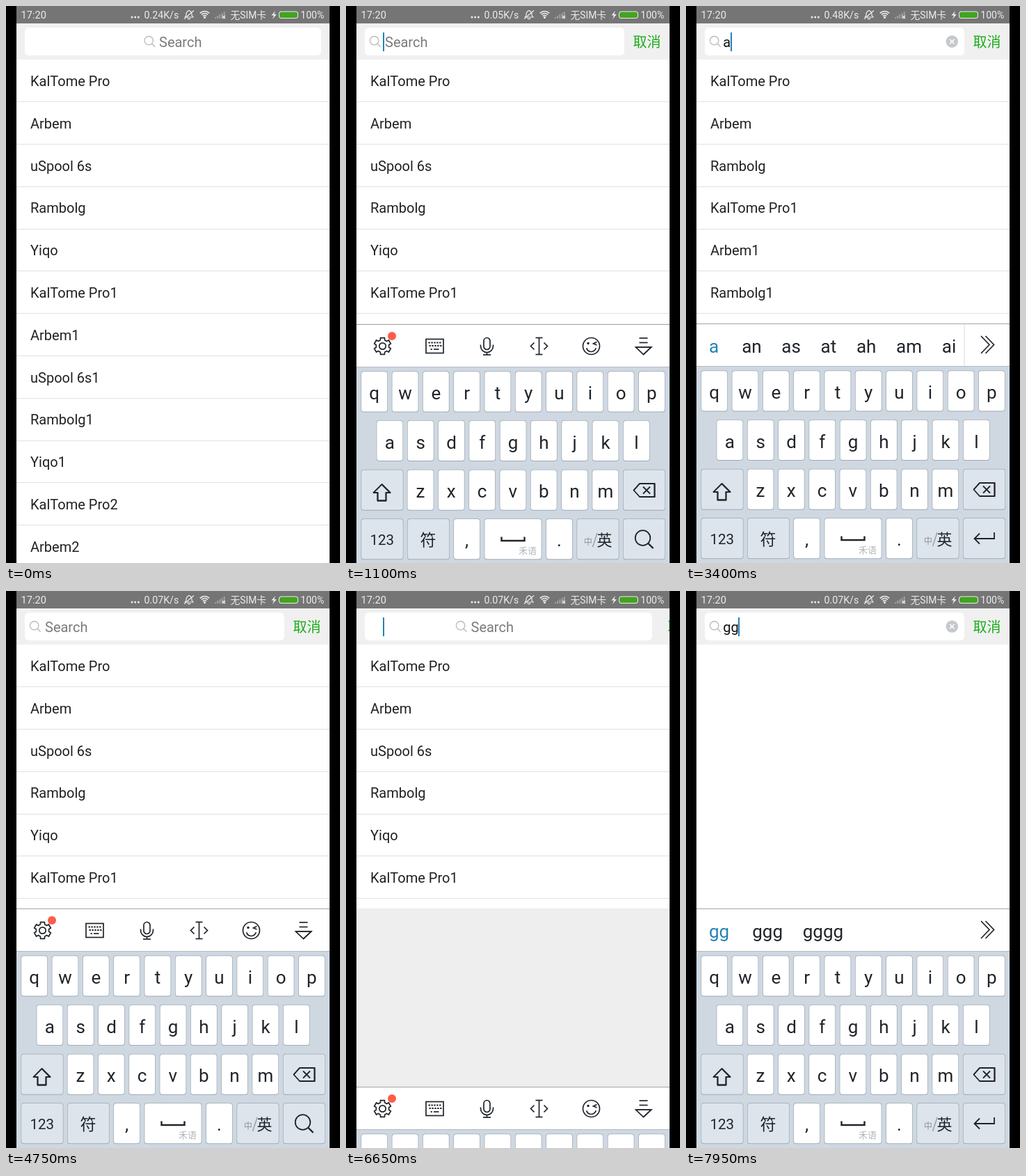
An HTML page with a canvas for the animation above (8 s loop, 480 by 800 pixels).

```html
<!DOCTYPE html>
<html lang="en">
<head>
<meta charset="utf-8">
<title>Search list</title>
<style>
html, body { margin: 0; width: 100%; height: 100%; overflow: hidden; background: #000; }
canvas { display: block; width: 480px; height: 800px; }
</style>
</head>
<body>
<canvas id="stage" width="480" height="800"></canvas>
<script>
const ctx = document.getElementById('stage').getContext('2d');
const LOOP = 8000, LEFT = 15, RIGHT = 465, KB_TOP = 456;
const SANS = 'Roboto, "Noto Sans CJK SC", "Noto Sans CJK", sans-serif';
const CJK = '"Noto Sans CJK SC", "Noto Sans CJK", sans-serif';
const INK = '#20242a', BLUE = '#2583b4';

const names = ['KalTome Pro', 'Arbem', 'uSpool 6s', 'Rambolg', 'Yiqo'];
const items = ['', 1, 2].flatMap(n => names.map(name => name + n));
const words = {
  a: ['a', 'an', 'as', 'at', 'ah', 'am', 'ai'],
  g: ['g', 'go', 'get', 'got', 'good', 'gas'],
  gg: ['gg', 'ggg', 'gggg']
};

// Timeline
const speeds = [[0, '0.24K/s'], [700, '0.05K/s'], [2800, '0.48K/s'], [4500, '0.07K/s']];
const edits = [[0, ''], [705, ''], [2400, 'a'], [4200, ''], [6555, ''], [7750, 'g'], [7950, 'gg']];
const OPEN = [705, 6555], CLOSE = 5400;

const latest = (list, t) => list.filter(e => e[0] <= t).pop();
const unit = x => Math.min(1, Math.max(0, x));
const smooth = x => (1 - Math.cos(Math.PI * unit(x))) / 2;
const slow = x => 1 - (1 - unit(x)) ** 2;
const speedUp = x => unit(x) ** 2;

const fieldOpen = t => smooth((t - OPEN[0]) / 290) - smooth((t - CLOSE) / 290) + smooth((t - OPEN[1]) / 290);
const keysOpen = t => slow((t - 750) / 370) - speedUp((t - 5430) / 428) + slow((t - 6600) / 370);

// Drawing helpers
function rect(x, y, w, h, color) {
  ctx.fillStyle = color;
  ctx.fillRect(x, y, w, h);
}
function round(x, y, w, h, r, color) {
  ctx.fillStyle = color;
  ctx.beginPath();
  ctx.roundRect(x, y, w, h, r);
  ctx.fill();
}
function text(s, x, y, size, color, align = 'left', family = SANS) {
  ctx.font = `${size}px ${family}`;
  ctx.textAlign = align;
  ctx.fillStyle = color;
  ctx.fillText(s, x, y);
}
function pen(color, width) {
  ctx.strokeStyle = color;
  ctx.lineWidth = width;
}
function line(...p) {
  ctx.beginPath();
  for (let i = 0; i < p.length; i += 2) ctx.lineTo(p[i], p[i + 1]);
  ctx.stroke();
}
function shape(...p) {
  line(...p);
  ctx.closePath();
  ctx.stroke();
}
function arc(x, y, r, from = 0, to = 2 * Math.PI) {
  ctx.beginPath();
  ctx.arc(x, y, r, from, to);
  ctx.stroke();
}
function dot(x, y, r, color) {
  ctx.fillStyle = color;
  ctx.beginPath();
  ctx.arc(x, y, r, 0, 2 * Math.PI);
  ctx.fill();
}
function at(x, y, draw) {
  ctx.save();
  ctx.translate(x, y);
  draw();
  ctx.restore();
}

function statusBar(t) {
  const c = '#ececec';
  rect(LEFT, 0, 450, 25, '#757575');
  text('17:20', 21.5, 18, 14.6, c);
  for (const x of [181, 185.7, 190.4]) dot(x, 16, 1.5, c);
  text(latest(speeds, t)[1], 198.5, 18, 14.2, c);
  pen(c, 1.2);
  at(263, 12.5, () => {
    line(-6, 3.5, -4, 1, -4, -1.5, -2.5, -4.5, 0, -6, 2.5, -4.5, 4, -1.5, 4, 1, 6, 3.5, -6, 3.5);
    arc(0, 4.5, 1.8, 0, Math.PI);
    line(-7, 6, 7, -6);
  });
  pen(c, 1.7);
  for (const r of [3.5, 6.5, 9.5]) arc(285.5, 17, r, -2.36, -0.78);
  dot(285.5, 16.5, 1.6, c);
  for (let i = 0; i < 5; i++) rect(300 + i * 3.2, 16 - i * 2, 1.8, 2 + i * 2, '#a5a5a5');
  pen(c, 1.1);
  line(311, 14, 315, 18);
  line(315, 14, 311, 18);
  text('无SIM卡', 322.5, 18, 13.8, c);
  ctx.fillStyle = c;
  ctx.beginPath();
  for (const [x, y] of [[387, 7], [381.5, 13.5], [385, 13.5], [383, 19], [388.8, 12], [385.4, 12]]) ctx.lineTo(x, y);
  ctx.fill();
  round(392, 7.5, 28, 10.5, 4, c);
  round(393, 8.5, 26, 8.5, 3, '#43a321');
  text('100%', 423.3, 18, 14, c);
}

function searchBar(t, value, typedAt) {
  const open = fieldOpen(t), rest = 1 - open;
  rect(LEFT, 25, 450, 52, '#f0f0f0');
  round(27, 31, 373 + 53 * rest, 40, 6, '#fff');
  at(34 + 164.5 * rest, 43, () => {
    pen('#b9bcc0', 1.4);
    arc(6.7, 6.7, 6.2);
    line(11.2, 11.2, 15.8, 15.8);
  });
  if (value) {
    text(value, 53.3, 59, 20, '#111');
    dot(382.3, 51, 8.7, '#c5c8cc');
    pen('#fff', 1.6);
    line(379, 47.7, 385.6, 54.3);
    line(385.6, 47.7, 379, 54.3);
  } else {
    text('Search', 56 + 164 * rest, 59, 20, '#7b7b7b');
  }
  const focused = t >= OPEN[0] && t < CLOSE || t >= OPEN[1];
  if (focused && (t - typedAt) % 1000 < 500) {
    ctx.font = `20px ${SANS}`;
    rect(53 + Math.round(ctx.measureText(value).width), 38, 2, 27, BLUE);
  }
  if (open > 0) text('取消', 412.5 + 66 * rest, 59, 20, '#1aad19', 'left', CJK);
}

function list(value, bottom) {
  rect(LEFT, 77, 450, 723, '#eee');
  ctx.save();
  ctx.beginPath();
  ctx.rect(LEFT, 77, 450, bottom - 77);
  ctx.clip();
  rect(LEFT, 77, 450, 723, '#fff');
  items.filter(s => s.toLowerCase().includes(value)).forEach((s, i) => {
    text(s, 35, 115 + Math.round(60.8 * i), 20, '#212121');
    rect(LEFT, Math.round(137.2 + 60.8 * i), 450, 1, '#e1e1e8');
  });
  ctx.restore();
}

function gear() {
  ctx.beginPath();
  for (let i = 0; i < 6; i++) {
    const a = i * Math.PI / 3 + Math.PI / 6;
    for (const [d, r] of [[-0.34, 9.3], [-0.24, 12.3], [0.24, 12.3], [0.34, 9.3]])
      ctx.lineTo(r * Math.cos(a + d), r * Math.sin(a + d));
  }
  ctx.closePath();
  ctx.stroke();
  arc(0, 0, 4.7);
}
function keyboardIcon() {
  ctx.strokeRect(-12.5, -10, 25, 20);
  for (const y of [-5, -0.5])
    for (let i = 0; i < 5; i++) rect(-9 + i * 3.9 + (y > -1 ? 1 : 0), y - 1, 2.4, 2, INK);
  line(-6, 4.5, -3.5, 4.5);
  line(-1.5, 4.5, 6, 4.5);
}
function mic() {
  ctx.beginPath();
  ctx.roundRect(-4.5, -12, 9, 17, 4.5);
  ctx.stroke();
  ctx.beginPath();
  ctx.moveTo(-9, -2);
  ctx.arc(0, 0, 9, Math.PI, 0, true);
  ctx.lineTo(9, -2);
  ctx.stroke();
  line(0, 9, 0, 12.5);
  line(-5.5, 12.5, 5.5, 12.5);
}
function caret() {
  line(0, -12, 0, 12);
  line(-5, -12, 5, -12);
  line(-5, 12, 5, 12);
  line(-7, -5, -12, 0, -7, 5);
  line(7, -5, 12, 0, 7, 5);
}
function smile() {
  arc(0, 0, 12);
  arc(0, 1, 7, 0.25, Math.PI - 0.25);
  dot(-4.5, -4, 1.7, INK);
  line(8, -6, 3, -3.5, 8, -1.5);
}
function hide() {
  line(-6, -11.5, 6, -11.5);
  line(-6, -5, 6, -5);
  shape(-11, 1.5, 11, 1.5, 0, 12);
}

function toolbar() {
  pen(INK, 1.7);
  [gear, keyboardIcon, mic, caret, smile, hide].forEach((icon, i) => at(52.5 + 75 * i, 31.5, icon));
  dot(66, 17, 6, '#ff5b4a');
}

function candidates(value) {
  let x = 33;
  words[value].forEach((w, i) => {
    text(w, x, 41.5, 26, i ? INK : BLUE);
    x += ctx.measureText(w).width + (i ? 28.7 : 33);
  });
  if (x > 300) {
    rect(399, 1, 66, 60, '#fff');
    rect(399, 1, 2, 60, '#ececec');
  }
  pen(INK, 1.7);
  line(424, 18, 436, 30.5, 424, 43);
  line(430.5, 18, 442.5, 30.5, 430.5, 43);
}

function key(x, row, w, special) {
  const y = 67.5 + 70.6 * row;
  round(x, y, w, 59, 4, '#9eaab6');
  round(x + 0.7, y + 0.7, w - 1.4, 57.3, 3.5, special ? '#dde4ec' : '#fff');
}

function keys(value) {
  rect(LEFT, 62, 450, 290, '#cfd8e1');
  ['qwertyuiop', 'asdfghjkl', 'zxcvbnm'].forEach((letters, row) => {
    const x0 = [21.5, 43.7, 87.8][row];
    [...letters].forEach((ch, i) => {
      const x = x0 + 44.3 * i;
      key(x, row, 38.4);
      text(ch, x + 19.2, 108 + 70.6 * row, 26, INK, 'center');
    });
  });
  for (const row of [2, 3]) for (const x of [21.5, 398]) key(x, row, 61, true);
  for (const x of [88, 331.5]) key(x, 3, 61, true);
  for (const x of [154.4, 287.3]) key(x, 3, 38.4);
  key(198.7, 3, 82.6);

  pen(INK, 1.8);
  ctx.lineJoin = 'round';
  shape(51.5, 230, 63.5, 242, 57.5, 242, 57.5, 253.5, 45.5, 253.5, 45.5, 242, 39.5, 242);
  shape(413.5, 238.5, 422, 229, 443.5, 229, 443.5, 248, 422, 248);
  line(427, 233.5, 437, 243.5);
  line(437, 233.5, 427, 243.5);
  ctx.lineJoin = 'miter';

  text('123', 51.8, 317, 20.5, INK, 'center');
  text('符', 118, 317.5, 23, INK, 'center', CJK);
  text(',', 173.6, 319, 26, INK, 'center');
  text('.', 306.5, 319, 26, INK, 'center');
  text('禾语', 248, 329.5, 13, '#b2b6bb', 'left', CJK);
  text('中', 342, 317, 12, '#8d949c', 'left', CJK);
  text('英', 360.5, 317.5, 22, INK, 'left', CJK);
  pen('#8d949c', 1.2);
  line(354.5, 320, 361, 300);
  pen(INK, 2.4);
  line(223.5, 305.5, 223.5, 311, 256.5, 311, 256.5, 305.5);
  pen(INK, 1.8);
  if (value) {
    line(443, 300, 443, 309, 414.5, 309);
    line(422, 301.5, 414.5, 309, 422, 316.5);
  } else {
    arc(426.5, 307, 10.8);
    pen(INK, 2.4);
    line(434.5, 315, 441.5, 322);
  }
}

function keyboard(top, value) {
  at(0, top, () => {
    rect(LEFT, 0, 450, 62, '#fff');
    rect(LEFT, 0, 450, 1, '#a2a5a8');
    if (value) candidates(value);
    else toolbar();
    keys(value);
    rect(LEFT, 61, 450, 1, '#b3bbc3');
  });
}

function render(t) {
  const [typedAt, value] = latest(edits, t);
  const up = keysOpen(t);
  const fitted = up > 0 && (t < 5430 || t >= 6600);
  rect(0, 0, 480, 800, '#000');
  ctx.save();
  ctx.beginPath();
  ctx.rect(LEFT, 0, RIGHT - LEFT, 800);
  ctx.clip();
  list(value, fitted ? KB_TOP : 800);
  searchBar(t, value, typedAt);
  statusBar(t);
  if (up > 0) keyboard(Math.round(800 - (800 - KB_TOP) * up), value);
  ctx.restore();
}

const start = performance.now();
function tick() {
  render((performance.now() - start) % LOOP);
  requestAnimationFrame(tick);
}
tick();
</script>
</body>
</html>
```
